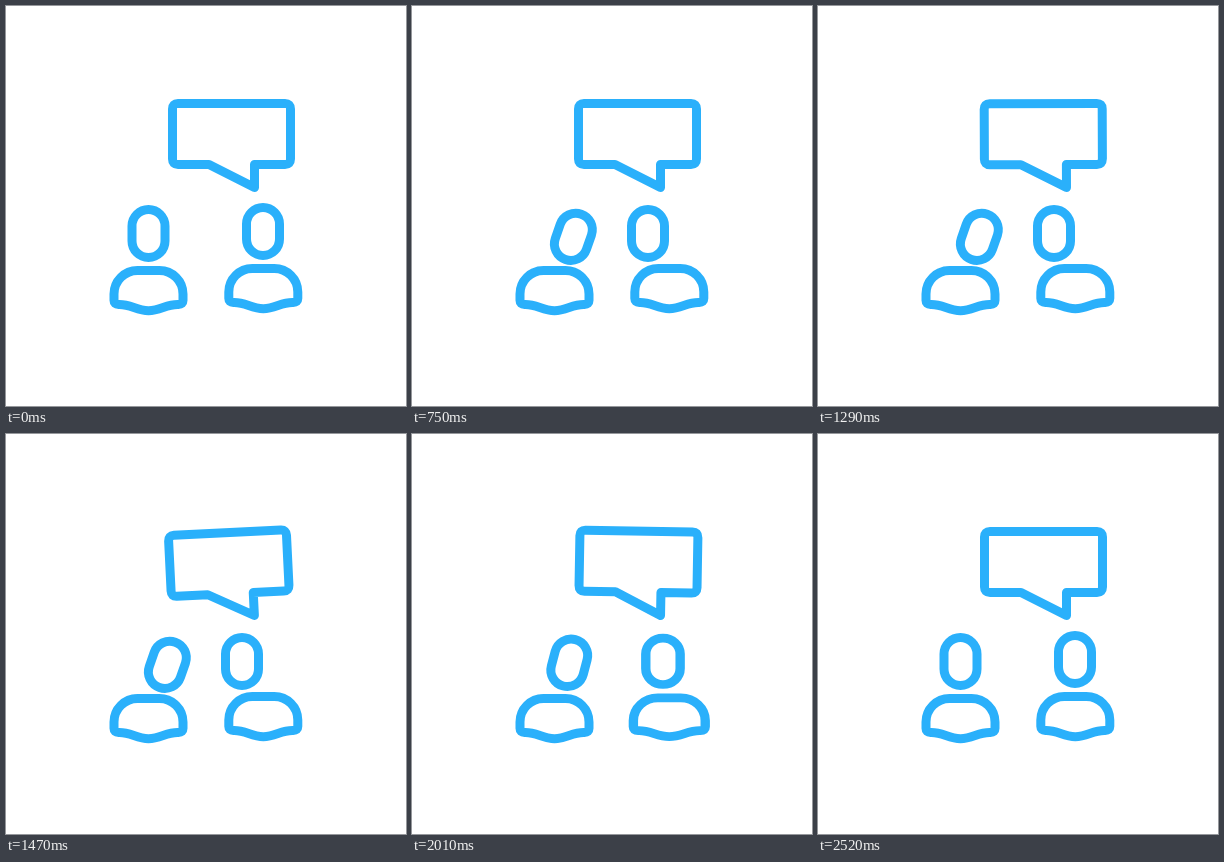
These frames come from a looping animation (400x400 px, 2.55 s). An HTML page:

```html
<!DOCTYPE html>
<html lang="en">
<head>
<meta charset="utf-8">
<title>Conversation</title>
<style>
  html, body { margin: 0; width: 100%; height: 100%; overflow: hidden; background: #fff; }
  svg { display: block; width: 100vw; height: 100vh; }
  .line { fill: none; stroke: #2ab0fb; stroke-width: 9; stroke-linejoin: round; stroke-linecap: round; }
</style>
</head>
<body>
<svg viewBox="0 0 400 400">
  <defs>
    <rect id="head" x="-16.5" y="-24" width="33" height="48" rx="16.5"/>
    <!-- origin: middle of the lower edge -->
    <path id="torso" d="M-34.5 -10V-16.5A23.5 23.5 0 0 1 -11 -40H11A23.5 23.5 0 0 1 34.5 -16.5V-10Q34.5 -6 30 -6C18 -6.5 12 .2 0 .2S-18 -6.5 -30 -6Q-34.5 -6 -34.5 -10Z"/>
  </defs>
  <g class="line">
    <path id="bubble" d="M172 97.5H279Q284.5 97.5 284.5 103V153Q284.5 158.5 279 158.5H248.5V181.5L203 158.5H172Q166.5 158.5 166.5 153V103Q166.5 97.5 172 97.5Z"/>
    <use id="headL" href="#head"/>
    <use id="torsoL" href="#torso"/>
    <use id="headR" href="#head"/>
    <use id="torsoR" href="#torso"/>
  </g>
</svg>
<script>
const LOOP = 2550, STEP = 30, TURN = 300;
const place = (id, value) => document.getElementById(id).setAttribute('transform', value);

const progress = (t, start, length) => Math.min(1, Math.max(0, (t - start) / length));
const ramp = (t, start, length) => (1 - Math.cos(Math.PI * progress(t, start, length))) / 2;
const pulse = (t, start, length) => Math.sin(Math.PI * progress(t, start, length)) ** 2;
const squash = s => `scale(${1 + 0.05 * s} ${1 - 0.04 * s})`;

// A wobble that swells towards its peak and dies away after it.
function wobble(t) {
  const peak = 1620, period = 450, d = t - peak;
  if (d < -0.75 * period || d > 1.75 * period) return 0;
  return 13 * Math.exp(-0.0056 * Math.abs(d)) * Math.cos(2 * Math.PI * d / period);
}

function drawLeft(t) {
  const back = 2040;
  const turned = ramp(t, 60, TURN) - ramp(t, back, TURN);
  const nod = pulse(t, 570, 540) + pulse(t, 1110, 540);
  const s = pulse(t, 60, TURN) + pulse(t, back, TURN);
  const tilt = 14.7 * turned + 6 * nod;
  const y = 227.5 - 0.6 * turned + nod + s;
  place('headL', `rotate(${tilt} 142.5 285) translate(142.5 ${y}) ${squash(s)}`);
  place('torsoL', `translate(142.5 304.5) ${squash(s)}`);
}

function drawRight(t) {
  const back = 1818;
  const turned = ramp(t, 60, 420) - ramp(t, back, TURN);
  const lean = pulse(t, 60, 660);
  const s = pulse(t, 60, TURN) + pulse(t, back, TURN);
  const x = 257 - 21 * turned, y = 225.5 + 2 * turned - 1.8 * lean + 1.5 * s;
  place('headR', `translate(${x} ${y}) rotate(${-12 * lean}) ${squash(s)}`);
  place('torsoR', `translate(257.3 302.5) ${squash(s)}`);
}

function draw(t) {
  place('bubble', `rotate(${wobble(t)} 248.5 184)`);
  drawLeft(t);
  drawRight(t);
}

const start = performance.now();
function tick(now) {
  const t = Math.max(0, now - start) % LOOP;
  draw(Math.floor(t / STEP) * STEP);
  requestAnimationFrame(tick);
}
draw(0);
requestAnimationFrame(tick);
</script>
</body>
</html>
```
